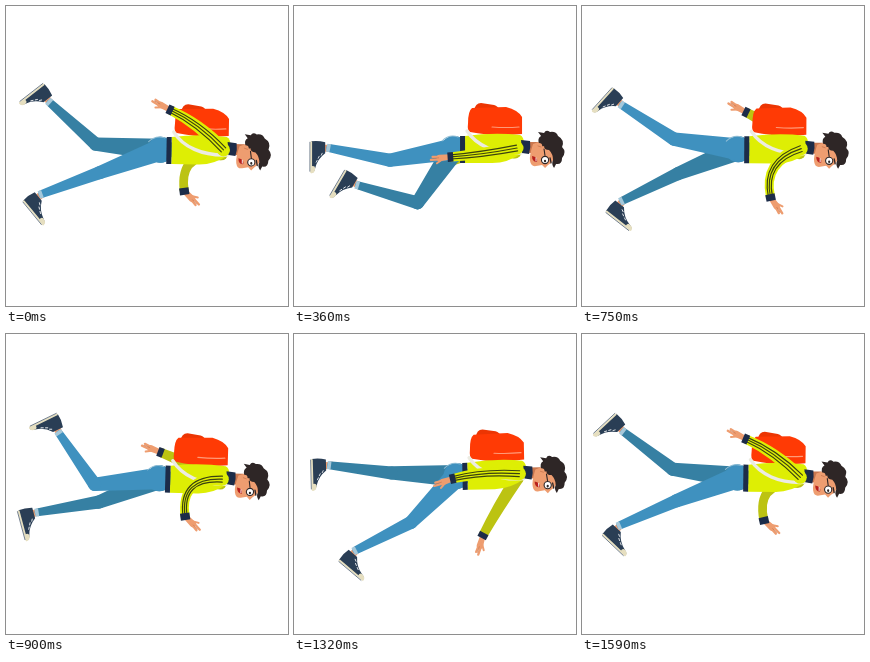
These frames come from a looping animation (282 by 300 pixels, 1620 ms). An HTML page with a canvas:

```html
<!DOCTYPE html>
<html lang="en">
<head>
<meta charset="utf-8">
<title>Walk cycle</title>
<style>
  html, body { margin: 0; width: 100%; height: 100%; overflow: hidden; background: #fff; }
  canvas { display: block; width: 282px; height: 300px; }
</style>
</head>
<body>
<canvas id="stage" width="282" height="300"></canvas>
<script>
const ctx = document.getElementById('stage').getContext('2d');
const LOOP = 1620, STEP = 30, HALF = LOOP / 2, TAU = 2 * Math.PI;
const HIP = [160, 143], SHOULDER = [223, 142], FAR_SHOULDER = [221, 146];
const THIGH = 65, SHIN = 61, UPPER_ARM = 35, FOREARM = 32, HAND = 22;
const LEG_START = 142, FAR_ARM_DELAY = 720;
const C = {
  yellow: '#deee04', shade: '#bcc312', stripe: '#3b4210', navy: '#1c2c49', shoe: '#2a3e55',
  jeans: '#3f91bf', jeansFar: '#3680a3', cuff: '#a5c8da', skin: '#ee9d70', skinDark: '#c9774f',
  red: '#ff3a05', redDark: '#ec3503', strap: '#ecebe2', hair: '#2e2626', sole: '#e6dfc0'
};

// Joint angles in degrees, evenly spaced over one loop; zero points at the ground (left).
const LEG = {
  thigh: [21, 11, -5, -9, 13, 55, 42, 22],
  shin: [4, -11, -8, -33, -57, -20, 33, 26],
  foot: [-5, 0, 1, 42, 66, 36, -62, -52]
};
const ARM = {
  upper: [-44, -16, 59, 18, -4, -3],
  fore: [-29, -12, 48, 94, 48, 6]
};

const rad = degrees => degrees * Math.PI / 180;
const mix = (a, b, k) => [a[0] + (b[0] - a[0]) * k, a[1] + (b[1] - a[1]) * k];
const heading = (p, q) => Math.atan2(q[1] - p[1], q[0] - p[0]);
const step = ([x, y], degrees, length) =>
  [x - Math.cos(rad(degrees)) * length, y + Math.sin(rad(degrees)) * length];

// Smooth periodic curve through evenly spaced values.
function cycle(values, t) {
  const n = values.length;
  const pos = ((t / LOOP) % 1 + 1) % 1 * n, i = Math.floor(pos), u = pos - i;
  const [a, b, c, d] = [-1, 0, 1, 2].map(k => values[(i + k + n) % n]);
  return b + u / 2 * (c - a + u * (2 * a - 5 * b + 4 * c - d + u * (3 * (b - c) + d - a)));
}

// The body rises and leans once per step.
function bodyAt(t) {
  const wave = peak => Math.cos((t - peak) / HALF * TAU);
  const lean = wave(540) - 0.17;
  const dx = 4.6 * wave(500) - 2.1, dy = -1.2 * lean, turn = -0.026 * lean;
  const c = Math.cos(turn), s = Math.sin(turn);
  return {
    dx, dy, turn,
    place([x, y]) {
      const u = x - HIP[0], v = y - HIP[1];
      return [HIP[0] + dx + u * c - v * s, HIP[1] + dy + u * s + v * c];
    }
  };
}

function fill(path, color) {
  ctx.fillStyle = color;
  ctx.fill(new Path2D(path));
}
function stroke(path, color, width) {
  ctx.strokeStyle = color;
  ctx.lineWidth = width;
  ctx.stroke(new Path2D(path));
}
function ellipse(x, y, rx, ry, color) {
  ctx.fillStyle = color;
  ctx.beginPath();
  ctx.ellipse(x, y, rx, ry, 0, 0, TAU);
  ctx.fill();
}
function taper(p, q, r1, r2, color) {
  const a = heading(p, q);
  ctx.fillStyle = color;
  ctx.beginPath();
  ctx.arc(...p, r1, a + Math.PI / 2, a - Math.PI / 2);
  ctx.arc(...q, r2, a - Math.PI / 2, a + Math.PI / 2);
  ctx.fill();
}
function band(p, q, width, color) {
  ctx.lineCap = 'butt';
  stroke(`M${p}L${q}`, color, width);
  ctx.lineCap = 'round';
}
function within([x, y], angle, draw) {
  ctx.save();
  ctx.translate(x, y);
  ctx.rotate(angle);
  draw();
  ctx.restore();
}

function drawShoe() {
  fill('M2-3.5H-8V3.5H2Z', C.skin);
  fill('M-5-6Q-12-8-19-7V24Q-16 25-15 20Q-13 11-5 5Z', C.shoe);
  fill('M-19 18Q-15 17-15 20Q-15 25-19 25Z', C.sole);
  stroke('M-19-6V24', C.sole, 1.8);
  stroke('M-20.3-6V23', C.shoe, 0.6);
  stroke('M-8 5L-9 7M-11 8L-12 10M-13 12L-14 14', '#fff', 0.8);
}

function drawLeg(t, body, color) {
  const phase = t - LEG_START;
  const hip = body.place(HIP);
  const knee = step(hip, cycle(LEG.thigh, phase), THIGH);
  const ankle = step(knee, cycle(LEG.shin, phase), SHIN);
  within(ankle, rad(cycle(LEG.foot, phase)), drawShoe);
  ellipse(...hip, 13, 13, color);
  taper(hip, knee, 11, 6.6, color);
  taper(knee, ankle, 6.6, 4, color);
  band(mix(ankle, knee, -0.06), mix(ankle, knee, 0), 8, C.cuff);
}

function drawHand() {
  taper([0, 0], [HAND * 0.5, 0], 2.6, 3.2, C.skin);
  stroke(`M${HAND * 0.5}-1.4L${HAND - 2}-1M${HAND * 0.5} 1.2L${HAND - 4} 1.8`, C.skin, 2.3);
  stroke(`M${HAND * 0.35}-1L${HAND * 0.65}-5`, C.skin, 2);
  stroke(`M${HAND * 0.55} .3H${HAND - 4}`, C.skinDark, 0.6);
}

function drawArm(t, root, body, color, striped) {
  const upper = cycle(ARM.upper, t), fore = cycle(ARM.fore, t);
  const wristBend = 50 * ((1 + Math.cos((t - 940) / LOOP * TAU)) / 2) ** 3;
  const shoulder = body.place(root);
  const elbow = step(shoulder, upper, UPPER_ARM);
  const wrist = step(elbow, fore, FOREARM);
  const control = mix(mix(shoulder, wrist, 0.5), elbow, 1.5);
  const shift = (p, a, d) => [p[0] - Math.sin(a) * d, p[1] + Math.cos(a) * d];
  const edge = d => [
    shift(shoulder, heading(shoulder, control), d * 1.3),
    shift(control, heading(shoulder, wrist), d * 1.2),
    shift(wrist, heading(control, wrist), d * 0.9)
  ];
  const tip = step(wrist, fore + wristBend, HAND);
  within(wrist, heading(wrist, tip), drawHand);
  const [a, b, c] = edge(5), [d, e, f] = edge(-5);
  fill(`M${a}Q${b} ${c}L${f}Q${e} ${d}Z`, color);
  ellipse(...shoulder, 6.5, 6.5, color);
  if (striped) {
    for (const offset of [-2.3, 0, 2.3]) {
      const [p, q, r] = edge(offset);
      stroke(`M${p}Q${q} ${r}`, C.stripe, 1.2);
    }
  }
  band(mix(wrist, control, -0.1), mix(wrist, control, 0.08), 9.5, C.navy);
}

function drawBackpack() {
  fill('M180 105Q181 97 187 97L200 99Q204 100 206 105Z', C.redDark);
  fill('M178 102L212 101Q224 104 228 111V128Q200 131 176 126Q173 125 174 117Q174 105 178 102Z', C.red);
  stroke('M198 121Q212 122 225 121', '#ff9a78', 1.2);
}

function drawTorso() {
  fill('M171 130Q200 126 226 129Q230 131 230 138L228 147Q214 157 198 157L171 157Z', C.yellow);
  fill('M166 130H171V157H166Z', C.navy);
  stroke('M148 135Q155 128 164 131', '#8fbdd5', 1);
  stroke('M173 125Q180 136 194 142T227 147', C.strap, 3.4);
}

function drawHead() {
  fill('M231 136H244V147H231Z', C.skinDark);
  fill('M239 138Q235 150 236 155Q237 161 242 160L248 159L251 162L254 159Q261 156 261 144L250 134Z', C.skin);
  fill('M227 134L236 135Q237 141 235 148L228 147Z', C.navy);
  fill('M245 138Q243 132 247 130L244 126L250 127Q252 123 256 126Q262 125 264 130Q271 134 268 141'
    + 'Q273 146 268 152Q268 159 262 158L260 162Q257 158 259 154Q259 148 255 144Q250 144 250 140Q247 141 245 138Z', C.hair);
  ellipse(245, 140, 3.2, 3, C.skin);
  stroke('M244 140L247 141', C.skinDark, 0.8);
  ellipse(251, 154, 3.6, 3.6, '#fff');
  stroke('M254.6 154A3.6 3.6 0 1 1 247.4 154A3.6 3.6 0 1 1 254.6 154M251 150L250 143', C.hair, 1.1);
  ellipse(251, 155, 1.1, 1.3, C.hair);
  stroke('M256 152L257 157', C.hair, 1.3);
  fill('M238 150Q244 151 243 156Q238 156 238 150Z', '#b8201c');
  stroke('M242 152V155', '#fff', 0.9);
}

function render(t) {
  const body = bodyAt(t);
  ctx.fillStyle = '#fff';
  ctx.fillRect(0, 0, 282, 300);
  ctx.lineCap = ctx.lineJoin = 'round';
  drawArm(t - FAR_ARM_DELAY, FAR_SHOULDER, body, C.shade, false);
  drawLeg(t + HALF, body, C.jeansFar);
  drawLeg(t, body, C.jeans);
  within([HIP[0] + body.dx, HIP[1] + body.dy], body.turn, () => {
    ctx.translate(-HIP[0], -HIP[1]);
    drawBackpack();
    drawTorso();
    drawHead();
  });
  drawArm(t, SHOULDER, body, C.yellow, true);
}

const started = performance.now();
function tick() {
  const t = (performance.now() - started) % LOOP;
  render(Math.floor(t / STEP) * STEP);
  requestAnimationFrame(tick);
}
tick();
</script>
</body>
</html>
```
